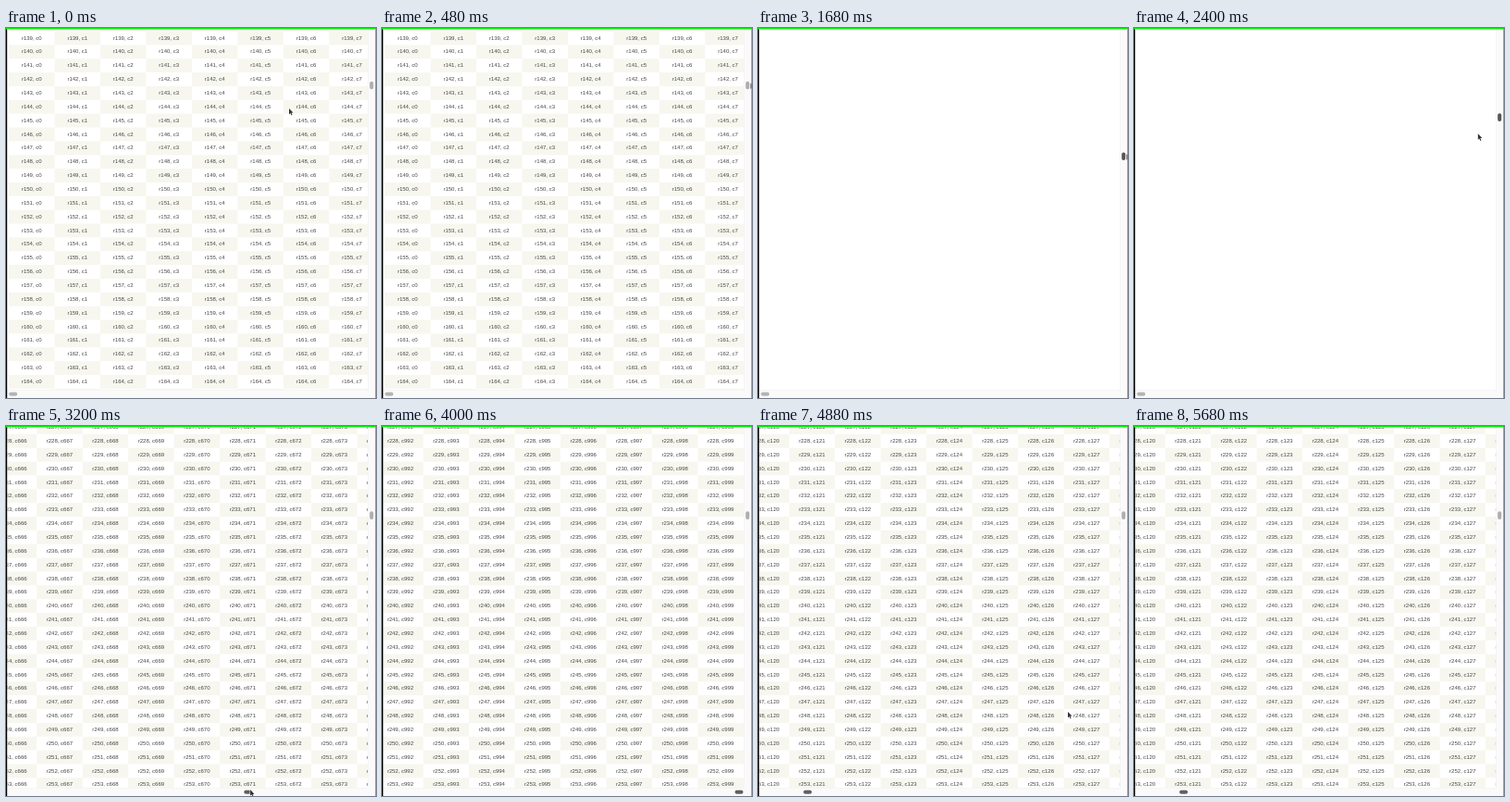
An HTML page with a canvas that plays this animation: 400x400 px, repeating every 5760 ms.

```html
<!DOCTYPE html>
<html lang="en">
<head>
<meta charset="utf-8">
<title>Virtual grid</title>
<style>
html, body { margin: 0; width: 100%; height: 100%; overflow: hidden; background: #fff; }
canvas { display: block; width: 100vmin; height: 100vmin; }
</style>
</head>
<body>
<canvas id="stage"></canvas>
<script>
const canvas = document.getElementById('stage');
const ctx = canvas.getContext('2d');
const LOOP = 5760, STEP = 80, LAG = 120;
const COUNT = 1000, COL_W = 49.48, ROW_H = 14.86;
const VIEW = { x: 3, y: 2, right: 391.5, bottom: 391 };

// Progress from 0 to 1 between two times, eased
function ease(t, from, to) {
  const p = Math.min(1, Math.max(0, (t - from) / (to - from)));
  return p * p * (3 - 2 * p);
}

const mix = (a, b, p) => a + (b - a) * p;
const glide = (a, b, p) => ({ x: mix(a.x, b.x, p), y: mix(a.y, b.y, p) });

// First visible row and column
function scrollAt(t) {
  const row = mix(mix(138.9, 405.06, ease(t, 480, 960)), 227.54, ease(t, 1200, 2320));
  const right = mix(mix(0, 666.39, ease(t, 2820, 3060)), 992.16, ease(t, 3240, 3760));
  return { row, col: mix(right, 120.38, ease(t, 4080, 4560)) };
}

const thumbY = row => 7.7 + row * 0.391;
const thumbX = col => 7.7 + col * 0.3813;

// The pointer holds a thumb while dragging and glides in between
function mouseAt(t, { row, col }) {
  const onRows = { x: 398.5, y: thumbY(row) - 2.5 };
  const onCols = { x: thumbX(col) + 2.3, y: 388 + 12 * (col / COUNT) ** 2 };
  const rest = { x: 335, y: 309 };
  if (t < 480) return glide({ x: 306, y: 87 }, onRows, ease(t, 0, 480));
  if (t < 4560) return glide(onRows, onCols, ease(t, 2320, 2820));
  if (t < 4880) return glide(onCols, rest, ease(t, 4560, 4880));
  return glide(rest, { x: 410, y: 330 }, ease(t, 5200, 5520));
}

function drawCells({ row, col }) {
  ctx.save();
  ctx.beginPath();
  ctx.rect(1.5, 1.5, VIEW.right - 1.5, VIEW.bottom - 1.5);
  ctx.clip();
  ctx.font = '6px "Liberation Sans", Arial, sans-serif';
  ctx.textAlign = 'center';
  ctx.textBaseline = 'middle';
  const r0 = Math.floor(row), c0 = Math.floor(col);
  for (let r = r0; r < Math.min(r0 + 28, COUNT); r++) {
    for (let c = c0; c < Math.min(c0 + 9, COUNT); c++) {
      const x = VIEW.x + (c - col) * COL_W;
      const y = VIEW.y + (r - row) * ROW_H;
      if ((r + c) % 2 === 0) {
        ctx.fillStyle = '#f7f7ef';
        ctx.fillRect(x, y, COL_W, ROW_H);
      }
      ctx.fillStyle = '#444';
      ctx.fillText(`r${r}, c${c}`, x + COL_W / 2, y + ROW_H / 2);
    }
  }
  ctx.restore();
}

function pill(x, y, w, h, color) {
  ctx.fillStyle = color;
  ctx.beginPath();
  ctx.roundRect(x - w / 2, y - h / 2, w, h, 2);
  ctx.fill();
}

function drawBars({ row, col }, t) {
  ctx.fillStyle = '#fafafa';
  ctx.fillRect(VIEW.right, 1, 8, 399);
  ctx.fillRect(1, VIEW.bottom, 398, 9);
  ctx.fillStyle = '#efefef';
  ctx.fillRect(VIEW.right - 0.5, 1, 0.5, 390);
  ctx.fillRect(1, VIEW.bottom, 391, 0.5);
  const rowsHeld = t >= 1200 && t < 2480;
  pill(395.2, thumbY(row), 4, 8.6, rowsHeld ? '#565656' : '#aeaeae');
  pill(thumbX(col), 395.7, 9, 4, t >= 2820 ? '#606060' : '#b4b4b4');
}

function drawMouse({ x, y }) {
  ctx.beginPath();
  ctx.moveTo(x, y);
  ctx.lineTo(x, y + 6.4);
  ctx.lineTo(x + 1.5, y + 5.1);
  ctx.lineTo(x + 2.6, y + 7.6);
  ctx.lineTo(x + 3.6, y + 7.1);
  ctx.lineTo(x + 2.5, y + 4.7);
  ctx.lineTo(x + 4.5, y + 4.6);
  ctx.closePath();
  ctx.lineJoin = 'round';
  ctx.lineWidth = 1;
  ctx.strokeStyle = '#fff';
  ctx.stroke();
  ctx.fillStyle = '#333';
  ctx.fill();
}

function drawFrame() {
  ctx.fillStyle = '#00f000';
  ctx.fillRect(0, 0, 400, 1.3);
  ctx.fillRect(399.2, 0, 0.8, 400);
  ctx.fillStyle = '#000';
  ctx.fillRect(0, 1.3, 1.2, 398.7);
}

function render(t) {
  const now = scrollAt(t), before = scrollAt(Math.max(0, t - LAG));
  // Cells catch up only once the scroll position settles
  const moving = Math.abs(now.row - before.row) + Math.abs(now.col - before.col) > 0.3;
  ctx.fillStyle = '#fff';
  ctx.fillRect(0, 0, 400, 400);
  if (!moving) drawCells(now);
  drawBars(now, t);
  drawMouse(mouseAt(t, now));
  drawFrame();
}

function resize() {
  const size = Math.min(innerWidth, innerHeight) * (window.devicePixelRatio || 1);
  canvas.width = canvas.height = Math.max(1, Math.round(size));
  ctx.setTransform(canvas.width / 400, 0, 0, canvas.width / 400, 0, 0);
}

const start = performance.now();
function tick(now) {
  const t = Math.max(0, now - start) % LOOP;
  render(Math.floor(t / STEP) * STEP);
  requestAnimationFrame(tick);
}

addEventListener('resize', resize);
resize();
render(0);
requestAnimationFrame(tick);
</script>
</body>
</html>
```
